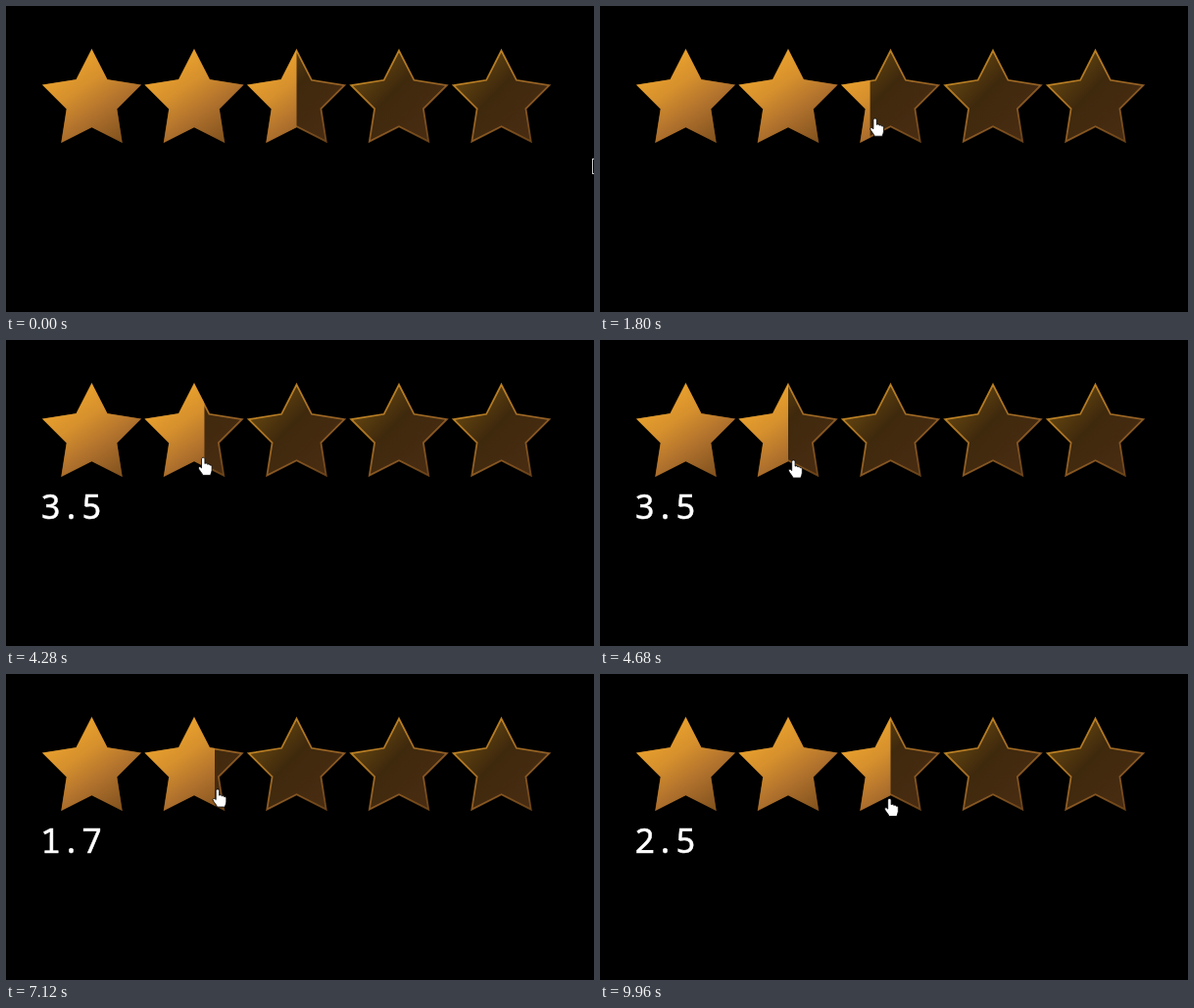
An HTML page that plays this animation: 600 px wide and 313 px high, repeating every 10 s.

```html
<!DOCTYPE html>
<html lang="en">
<head>
<meta charset="utf-8">
<title>Star rating</title>
<style>
  html, body { margin: 0; width: 100%; height: 100%; overflow: hidden; background: #000; }
  svg { display: block; width: 600px; height: 313px; }
  text {
    font: 35px "Noto Sans Mono", "DejaVu Sans Mono", monospace;
    fill: #fff; stroke: #fff; stroke-width: .5px;
  }
</style>
</head>
<body>
<svg viewBox="0 0 600 313">
  <defs>
    <linearGradient id="gold" x1=".2" y1=".1" x2=".8" y2=".95">
      <stop offset="0" stop-color="#eea52c"/>
      <stop offset=".35" stop-color="#d6902d"/>
      <stop offset=".65" stop-color="#b1722d"/>
      <stop offset="1" stop-color="#85541f"/>
    </linearGradient>
    <linearGradient id="dim" x1=".05" y1=".2" x2=".8" y2=".9">
      <stop offset="0" stop-color="#6a4a10"/>
      <stop offset=".45" stop-color="#3f290d"/>
      <stop offset="1" stop-color="#482c12"/>
    </linearGradient>
    <clipPath id="lit"><rect id="level" height="313"/></clipPath>
  </defs>
  <g id="empty" fill="url(#dim)" stroke="url(#gold)" stroke-width="1.8" stroke-opacity=".75"></g>
  <g id="full" fill="url(#gold)" clip-path="url(#lit)"></g>
  <text id="score" x="35" y="182.9"></text>
  <rect id="edge" x="598.5" y="156.5" width="8" height="15" fill="none" stroke="#ccc"/>
  <path id="hand" fill="#fff" stroke="#000" stroke-width=".8" stroke-linejoin="round"
    d="M-1.8 1.5C-1.8-.6 1.6-.6 1.6 1.5V6.2C2.4 5.4 4.2 5.6 4.4 7 5.2 6.2 6.6 6.6 6.8 7.8 7.8 7.2 8.8 8 8.8 9.2V13C8.8 15 7.6 16 7.4 18H-.6C-.8 16-4.6 12.6-5 10.6-5 9-3 8.8-1.8 10.6Z"/>
</svg>
<script>
const LOOP = 10000, TICK = 40;
const STARS = 5, LEFT = 35.25, CELL = 104.5, CENTER_Y = 97;
const HOTSPOT = 2.6, FIRST_RATING = 2.5;
const $ = id => document.getElementById(id);

// Pointer moves: start, end, x, y. It rests in between.
const moves = [
  [40, 680, 309.5, 115],
  [1080, 1440, 63, 114],
  [1440, 2080, 430, 116],
  [2120, 2440, 398.5, 118],
  [4000, 4400, 147, 121],
  [4400, 4680, 197.5, 123],
  [4680, 5000, 195.5, 123],
  [6080, 6760, 216, 118],
  [8240, 8600, 252, 126.5],
  [8600, 9160, 265, 127],
  [9280, 9760, 295.5, 127.5]
];
const clicks = [2720, 5360, 7080, 9960];

const ease = p => p * p * (3 - 2 * p);

function pointerAt(t) {
  let x = 601, y = 160;
  for (const [from, to, toX, toY] of moves) {
    const e = ease(Math.min(1, Math.max(0, (t - from) / (to - from))));
    x += (toX - x) * e;
    y += (toY - y) * e;
  }
  return { x, y };
}

function ratingAt(t) {
  const cells = (pointerAt(t).x + HOTSPOT - LEFT) / CELL;
  return cells > STARS ? FIRST_RATING : Math.floor(cells * 10) / 10;
}

function addStar(parent, cx, outer, inner) {
  const points = Array.from({ length: 10 }, (_, i) => {
    const r = i % 2 ? inner : outer, a = (i * 36 - 90) * Math.PI / 180;
    return `${(cx + r * Math.cos(a)).toFixed(2)},${(CENTER_Y + r * Math.sin(a)).toFixed(2)}`;
  });
  const el = document.createElementNS("http://www.w3.org/2000/svg", "polygon");
  el.setAttribute("points", points.join(" "));
  parent.append(el);
}

for (let i = 0; i < STARS; i++) {
  const cx = LEFT + CELL * (i + 0.5);
  addStar($("empty"), cx, 51.4, 26.2);
  addStar($("full"), cx, 52.6, 26.9);
}

function draw(t) {
  const { x, y } = pointerAt(t);
  const click = clicks.findLast(c => c <= t);
  $("level").setAttribute("width", LEFT + CELL * ratingAt(t));
  $("hand").setAttribute("transform", `translate(${x.toFixed(2)} ${y.toFixed(2)})`);
  $("hand").style.display = t < TICK ? "none" : "";
  $("edge").style.display = t < TICK ? "" : "none";
  $("score").textContent = click ? ratingAt(click).toFixed(1) : "";
}

const start = performance.now();
function frame() {
  const t = (performance.now() - start) % LOOP;
  draw(Math.floor(t / TICK) * TICK);
  requestAnimationFrame(frame);
}
frame();
</script>
</body>
</html>
```
